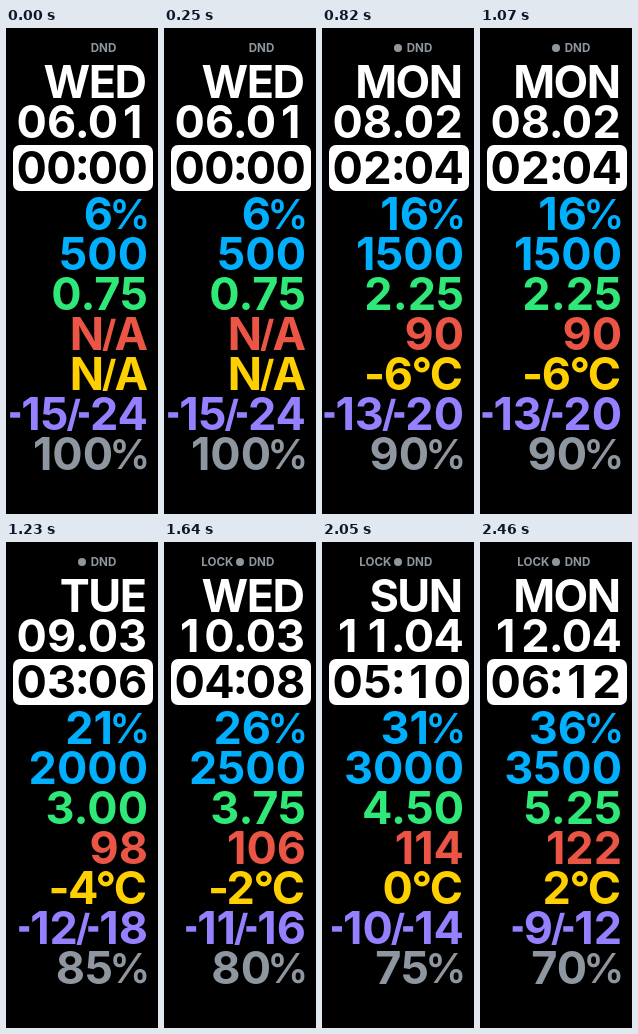
Animation of 152 by 486 pixels, one loop 2.87 s. Source, as an HTML page:

```html
<!DOCTYPE html>
<html lang="en">
<head>
<meta charset="utf-8">
<title>Watch face</title>
<style>
html, body { margin: 0; width: 100%; height: 100%; overflow: hidden; background: #000; }
svg { display: block; }
text { font: 700 45px Inter, sans-serif; text-anchor: end; }
.cell { text-anchor: middle; font-feature-settings: "calt" 0; }
.tight { letter-spacing: -1.5px; }
.percent { font-size: 41px; font-weight: 600; }
.slash { font-size: 37px; }
.status { font-size: 11.6px; }
</style>
</head>
<body>
<svg id="face" width="152" height="486" viewBox="0 0 152 486"></svg>
<script>
const STEP = 410, STEPS = 7;
const RIGHT = 142, TIGHT_RIGHT = 139.6;
const WHITE = "#fff", BLACK = "#000", BLUE = "#00b0ff", GREEN = "#30e878",
      RED = "#eb5545", YELLOW = "#ffd000", PURPLE = "#9780ff", GREY = "#8e979f";
const DAYS = ["WED", "SUN", "MON", "TUE"];
const CELLS = [25.6, 55.5, 76.2, 96.9, 126.6];
const face = document.getElementById("face");
const pad = n => String(n).padStart(2, "0");
const rowY = row => 202.2 + 40 * row;

function add(tag, attributes, content = "") {
  const node = document.createElementNS("http://www.w3.org/2000/svg", tag);
  for (const key in attributes) node.setAttribute(key, attributes[key]);
  node.textContent = content;
  face.append(node);
  return node;
}

function write(content, y, fill, x = RIGHT, style = "") {
  return add("text", { x, y, fill, class: style }, content);
}

function writeTight(content, y, fill) {
  write(content, y, fill, TIGHT_RIGHT, "tight");
}

// Fixed-width digits around a separator
function writeCells(content, y, fill) {
  [...content].forEach((char, i) => {
    const lift = char === ":" ? 4.3 : 0;
    write(char, y - lift, fill, CELLS[i], "cell");
  });
}

function writePercent(value, y, fill) {
  write("%", y - 1.3, fill, 144.5, "percent");
  write(value, y, fill, 107);
}

// Right to left, with short minus signs and a tucked-in slash
function writeParts(parts, y, fill) {
  let x = RIGHT;
  for (const part of parts.reverse()) {
    if (part === "-") {
      x -= 11;
      add("rect", { x, y: y - 18, width: 10, height: 5.5, fill });
    } else if (part === "/") {
      x += 2;
      x -= write(part, y - 3.5, fill, x, "slash").getComputedTextLength() - 2;
    } else {
      x -= write(part, y, fill, x).getComputedTextLength();
    }
  }
}

function draw(i) {
  face.replaceChildren();
  if (i >= 4) write("LOCK", 24, GREY, 69.3, "status");
  if (i >= 2) add("circle", { cx: 76, cy: 20, r: 4, fill: GREY });
  write("DND", 24, GREY, 110.3, "status");

  writeTight(DAYS[i % 4], 69.7, WHITE);
  writeCells(pad(6 + i) + "." + pad(1 + Math.ceil(i / 2)), 109.7, WHITE);
  add("rect", { x: 7, y: 117, width: 140, height: 46, rx: 7, fill: WHITE });
  writeCells(pad(i) + ":" + pad(2 * i), 156.2, BLACK);

  writePercent(6 + 5 * i, rowY(0), BLUE);
  write(500 * (i + 1), rowY(1), BLUE);
  write((0.75 * (i + 1)).toFixed(2), rowY(2), GREEN);
  if (i >= 2) {
    write(74 + 8 * i, rowY(3), RED);
    writeTight(2 * i - 10 + "°C", rowY(4), YELLOW);
  } else {
    writeParts(["N", "/", "A"], rowY(3), RED);
    writeParts(["N", "/", "A"], rowY(4), YELLOW);
  }
  writeParts(["-", 15 - i, "/", "-", 24 - 2 * i], rowY(5), PURPLE);
  writePercent(100 - 5 * i, rowY(6), GREY);
}

let shown = -1;
function tick() {
  const i = Math.floor(performance.now() / STEP) % STEPS;
  if (i !== shown) draw(shown = i);
  requestAnimationFrame(tick);
}
tick();
</script>
</body>
</html>
```
